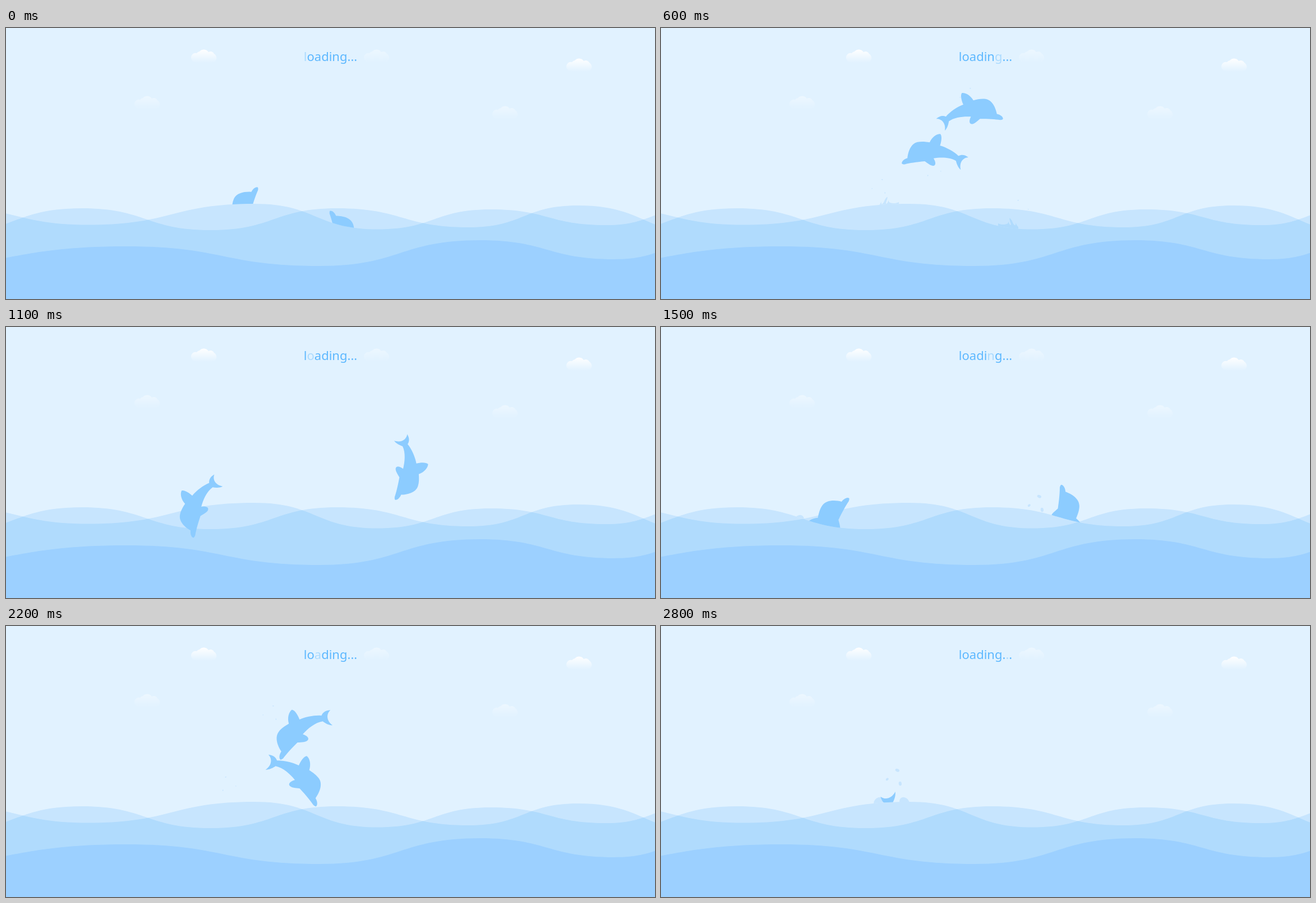
Write an HTML page with a canvas that moves like this. It is 1157 by 484 pixels and loops after 2900 ms.

```html
<!DOCTYPE html>
<html lang="en">
<head>
<meta charset="utf-8">
<title>Loading</title>
<style>
  html, body { margin: 0; height: 100%; overflow: hidden; background: #e1f2ff; }
  canvas { display: block; }
</style>
</head>
<body>
<canvas id="stage" width="1157" height="484"></canvas>
<script>
const ctx = document.getElementById('stage').getContext('2d');
const W = 1157, H = 484, LOOP = 2900, STEP = 100;
const SKY = '#e1f2ff', LIGHT = '#c7e5fe', MID = '#b0dbfd', DEEP = '#9cd0ff', SKIN = '#8cccff';

// A surface runs smoothly through its crests and troughs (x, y pairs);
// it gives the water below it and the clip area above it.
function surface(x, y, ...rest) {
  let d = `M${x} ${y}`;
  for (let i = 0; i < rest.length; i += 2) {
    const [nx, ny] = rest.slice(i, i + 2), mx = (x + nx) / 2;
    d += `C${mx} ${y} ${mx} ${ny} ${nx} ${ny}`;
    [x, y] = [nx, ny];
  }
  const close = edge => new Path2D(`${d}V${edge}H-300Z`);
  return { water: close(H), above: close(0) };
}
const A = surface(-110, 368, 135, 322, 365, 361, 590, 322, 825, 356, 1020, 317, 1255, 368);
const B = surface(-110, 320, 148, 351.5, 443, 314, 662, 359.5, 864, 324, 1070, 352, 1230, 322);
const FRONT = surface(-210, 430, 215, 390, 560, 425, 845, 379, 1085, 413, 1240, 387);

const dolphin = new Path2D('M55-6C55-9 50-13 42-13.5C38-25 29-39 16-39C8-39 0-36-7-33C-14-42-24-46-31-44' +
  'C-34-39-29-28-25-22C-36-16-49-4-55 6C-62 4-68 7-73 13C-63 11-53 18-53 33C-49 28-48 20-48 14' +
  'C-38 4-20 0-7-1C-10 8-8 13-4 13C1 13 6 6 11 .5C28-2 40-3 50-3C54-4 55-5 55-6Z');
const crown = new Path2D('M-36 5C-31 0-28-5-27-11C-27-5-26 0-24-1C-16-4-15-22-5-27C-3-18-12-8-9-2' +
  'C-5-2-3-8-1-15C0-9 2-7 5-6C15-2 28-4 36-8L36 20L-36 20Z');
const cloud = new Path2D('M2 20A8 8 0 0 1 10 7A7 7 0 0 1 15 4A10 10 0 0 1 31 5A7 7 0 0 1 41 8A8.5 8.5 0 0 1 44 20Q42 24 36 24H10Q4 24 2 20Z');

// Four poses per jump: leaving the water, rising, falling, under water.
// A pose is x, y, degrees.
const jumps = [
  { start: 0, fall: 800, size: .92, dir: 1, rise: B, land: A,
    poses: [[433, 333, -66], [448, 203, -41], [667, 158, 61], [715, 390, 150]] },
  { start: 0, fall: 800, size: .92, dir: -1, rise: B, land: FRONT,
    poses: [[590, 376, -70], [547, 266, -13], [410, 239, 40], [295, 440, 120]] },
  { start: 1500, fall: 900, size: .97, dir: 1, rise: A, land: FRONT,
    poses: [[310, 353, -56], [394, 245, 0], [585, 334, 90], [594, 530, 145]] },
  { start: 1500, fall: 900, size: .97, dir: -1, rise: A, land: B,
    poses: [[708, 335, -90], [677, 167, -20], [441, 247, 98], [456, 374, 166]] }
];

// peak time, x, y, direction, size, colour, surface
const crowns = [
  [400, 406, 315, 1, 1, LIGHT, B], [400, 619, 353, -1, 1, MID, B],
  [1700, 314, 334, 1, .95, LIGHT, A], [1700, 707, 338, -1, .95, LIGHT, A]
];

// peak time, x, y, surface
const bumps = [[1700, 269, 345, A], [1700, 704, 342, A], [2800, 411, 315, B]];

// time, x, y, direction
const bursts = [
  [400, 390, 268, -1], [400, 641, 305, 1], [800, 547, 121, -1], [800, 485, 253, 1], [1500, 670, 316, -1],
  [1900, 303, 306, 1], [1900, 730, 260, -1], [2400, 472, 156, -1], [2400, 396, 283, 1], [2800, 417, 271, -1]
];

function fill(path, color) {
  ctx.fillStyle = color;
  ctx.fill(path);
}

function ellipse(x, y, rx, ry, tilt, color) {
  ctx.beginPath();
  ctx.ellipse(x, y, rx, ry, tilt, 0, 7);
  ctx.fillStyle = color;
  ctx.fill();
}

function within(area, draw) {
  ctx.save();
  ctx.clip(area);
  draw();
  ctx.restore();
}

const fade = (t, peak, span) => Math.max(0, 1 - Math.abs(t - peak) / span);

// Smooth interpolation through unevenly spaced poses.
function poseAt(times, poses, t) {
  let i = 0;
  while (i < times.length - 2 && t >= times[i + 1]) i++;
  const j = i + 1, before = Math.max(i - 1, 0), after = Math.min(j + 1, times.length - 1);
  const h = times[j] - times[i], u = (t - times[i]) / h;
  return poses[i].map((a, c) => {
    const slope = (m, n) => (poses[n][c] - poses[m][c]) / (times[n] - times[m]) * h;
    const d = poses[j][c] - a, in0 = slope(before, j), in1 = slope(i, after);
    return a + u * (in0 + u * (3 * d - 2 * in0 - in1 + u * (in0 + in1 - 2 * d)));
  });
}

function drawCloud(x, y, alpha) {
  const shade = ctx.createLinearGradient(0, 0, 0, 24);
  shade.addColorStop(0, '#fff');
  shade.addColorStop(1, '#fff0');
  ctx.save();
  ctx.translate(x, y);
  ctx.globalAlpha = alpha;
  fill(cloud, shade);
  ctx.restore();
}

function drawScene() {
  ctx.fillStyle = SKY;
  ctx.fillRect(0, 0, W, H);
  drawCloud(330, 38, 1);
  drawCloud(999, 54, 1);
  drawCloud(638, 38, .4);
  drawCloud(229, 121, .4);
  drawCloud(867, 139, .4);
  fill(A.water, LIGHT);
  fill(B.water, LIGHT);
  within(A.water, () => fill(B.water, MID));
  fill(FRONT.water, DEEP);
}

function drawText(t) {
  ctx.font = '22px "Noto Sans", "Open Sans", sans-serif';
  ctx.fillStyle = '#5db8ff';
  const word = 'loading...', faded = t / STEP % word.length;
  let x = (W - ctx.measureText(word).width) / 2;
  [...word].forEach((ch, i) => {
    ctx.globalAlpha = i === faded ? .4 : 1;
    ctx.fillText(ch, x, 59);
    x += ctx.measureText(ch).width;
  });
  ctx.globalAlpha = 1;
}

function drawSplashes(t) {
  for (const [peak, x, y, dir, size, color, level] of crowns) {
    const k = size * fade(t, peak, 400);
    if (k) within(level.above, () => {
      ctx.translate(x, y);
      ctx.scale(dir * k, k);
      fill(crown, color);
    });
  }
  // The right-hand bump follows the left-hand one.
  for (const [peak, x, y, level] of bumps) for (const side of [-1, 1]) {
    const k = fade(t, peak + side * 100, 300);
    within(level.above, () => ellipse(x + side * 23, y, 12 * k, 15 * k, -side * .7, LIGHT));
  }
}

// Three drops on a ring, carried by gravity.
function drawDrops(t) {
  for (const [time, x, y, dir] of bursts) {
    const k = fade(t, time, 300), d = (t - time) / 100;
    for (let i = 0; i < 3; i++) {
      const a = .2 + i * 2.1, r = i ? k : k * .75;
      ellipse(x + dir * 14 * Math.cos(a), y + 14 * Math.sin(a) + 4 * d + 2 * d * d,
        3.8 * r, 2.6 * r, dir * (i + .7), LIGHT);
    }
  }
}

function drawDolphins(t) {
  for (const { start, fall, size, dir, rise, land, poses } of jumps) {
    const age = t - start;
    if (age < 0 || age > 1400) continue;
    const [x, y, angle] = poseAt([0, 400, fall, 1400], poses, age);
    within((age < 600 ? rise : land).above, () => {
      ctx.translate(x, y);
      ctx.scale(dir * size, size);
      ctx.rotate(angle * Math.PI / 180);
      fill(dolphin, SKIN);
    });
  }
}

function frame(now) {
  const t = Math.floor(now % LOOP / STEP) * STEP;
  drawScene();
  drawText(t);
  drawSplashes(t);
  drawDrops(t);
  drawDolphins(t);
  requestAnimationFrame(frame);
}
frame(0);
</script>
</body>
</html>
```
